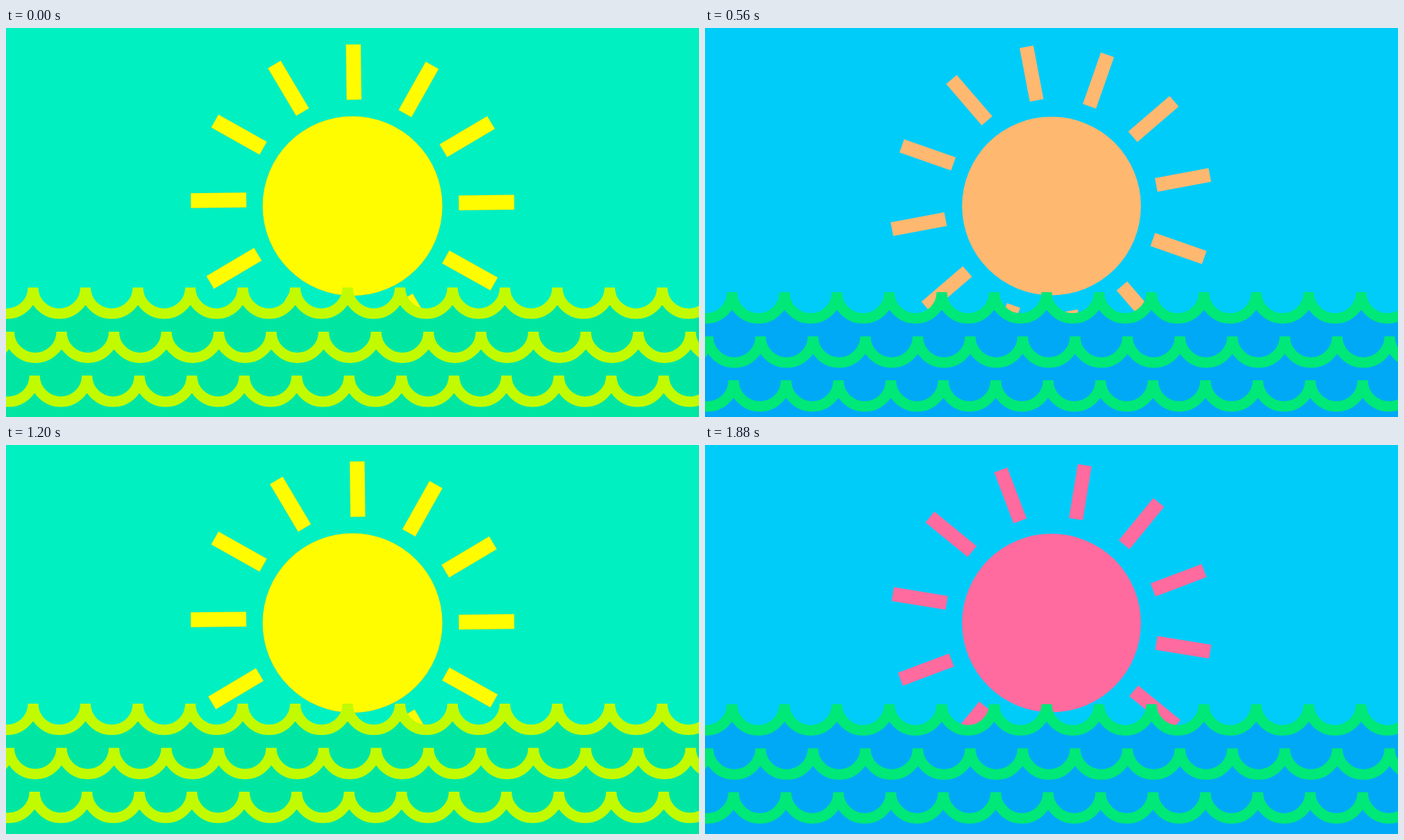
Recreate the animation shown at these times as an HTML page with a canvas. Size 998 by 561 pixels, loop 1.92 s.

```html
<!DOCTYPE html>
<html>
<head>
<meta charset="utf-8">
<style>
html, body { margin: 0; width: 100%; height: 100%; overflow: hidden; background: #00f0c2; }
canvas { display: block; }
</style>
</head>
<body>
<canvas id="stage" width="998" height="561"></canvas>
<script>
const W = 998, H = 561, STEP = 40, STEPS = 48;
const ctx = document.getElementById('stage').getContext('2d');
const rad = deg => deg * Math.PI / 180;

// One sun colour for each pose of the rays.
const day = { sky: '#00f0c2', sea: '#00e6a2', wave: '#c2fa00', edge: '#ffe800',
  suns: ['#fffc00', '#ffe900', '#ff9200'] };
const dusk = { sky: '#00ccfa', sea: '#00a9f5', wave: '#00e878', edge: '#00ccfa',
  suns: ['#ffca65', '#ffb870', '#ff6b9f'] };

// The water rises and falls in straight lines between a low and a high point.
const low = { n: 15.6, y: 381.8 }, high = { n: 37, y: 368.8 };

function tideAt(n) {
  const fall = high.n - low.n;
  const since = (n - low.n + STEPS) % STEPS;
  const part = since < fall ? since / fall : (STEPS - since) / (STEPS - fall);
  return low.y + (high.y - low.y) * part;
}

// Rays stand 30 degrees apart; the hand-drawn ring bunches slightly towards one side.
function sun(turn, lean, inset, color) {
  ctx.fillStyle = color;
  ctx.beginPath();
  ctx.arc(499, 256.7, 129.5 - inset, 0, 7);
  ctx.fill();
  for (let a = 0; a < 360; a += 30) {
    const pos = rad(a + turn + 0.5 + 1.9 * Math.cos(rad(a + lean)));
    ctx.save();
    ctx.translate(499 + 193 * Math.sin(pos), 256.5 - 193 * Math.cos(pos));
    ctx.rotate(rad(a + turn - 0.7));
    ctx.fillRect(inset - 10.75, inset - 40, 21.5 - 2 * inset, 80 - 2 * inset);
    ctx.restore();
  }
}

function waveRow(peak, y, color, seaColor) {
  const r = 37.75;
  ctx.beginPath();
  for (let x = peak - r; x < W + 2 * r; x += 2 * r) ctx.arc(x, y, r, Math.PI, 0, true);
  ctx.strokeStyle = color;
  ctx.lineWidth = 15;
  if (seaColor) {
    const sea = new Path2D();
    for (let x = peak - r; x < W + 2 * r; x += 2 * r) sea.arc(x, y, r, Math.PI, 0, true);
    sea.lineTo(W + 4 * r, H);
    sea.lineTo(-4 * r, H);
    ctx.fillStyle = seaColor;
    ctx.fill(sea);
  }
  ctx.lineJoin = 'bevel';
  ctx.stroke();
}

function draw(now) {
  const n = Math.floor(now / STEP) % STEPS;
  const pose = Math.floor(n / 8) % 3;
  const lean = n < STEPS / 2 ? 90 : 30;
  const colors = n % 3 === 2 ? dusk : day;

  ctx.fillStyle = colors.sky;
  ctx.fillRect(0, 0, W, H);
  sun(pose * 20, lean, 0, colors.edge);
  sun(pose * 20, lean, 0.7, colors.suns[pose]);

  const y = tideAt(n);
  waveRow(39, y, colors.wave, colors.sea);
  waveRow(4.5, y + 63.7, colors.wave);
  waveRow(41.2, y + 127, colors.wave);
  requestAnimationFrame(draw);
}

requestAnimationFrame(draw);
</script>
</body>
</html>
```
